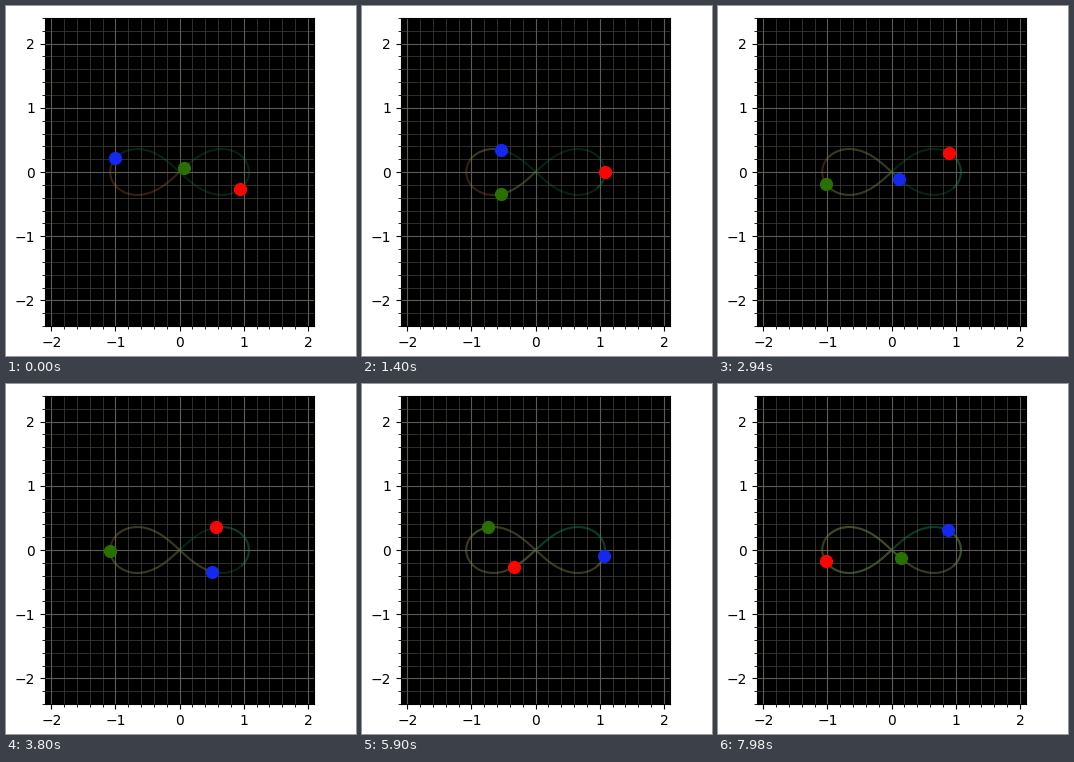
A matplotlib script that plays this animation: 350 by 350 pixels, repeating every 8000 ms.

```python
"""Three equal masses chasing each other along a figure-eight orbit."""
import numpy as np
import matplotlib.pyplot as plt
from matplotlib.animation import FuncAnimation
from matplotlib.collections import LineCollection

SIZE, DPI = 350, 100
TICK_MS, LOOP_MS = 20, 8000
DT = 0.0198
LEAD = 103  # steps already travelled when the loop starts
STEPS = LEAD + 172
XMAX, YMAX = 2.1, 2.4
LEFT, BOTTOM, WIDTH, HEIGHT = 38.83, 30, 269.5, 308  # plot box in pixels

DOTS = ["#fc0500", "#2a7000", "#1428f0"]
TRAILS = [("#148250", 0.27), ("#148250", 0.27), ("#b06e38", 0.30)]


def deriv(state):
    pos, vel = state
    gap = pos[None, :, :] - pos[:, None, :]
    dist = np.sqrt((gap ** 2).sum(axis=2)) + np.eye(3)
    acc = (gap / dist[:, :, None] ** 3).sum(axis=1)
    return np.array([vel, acc])


def orbit():
    """Positions of the three bodies at every step, by Runge-Kutta."""
    p = np.array([0.97000436, -0.24308753])
    v = np.array([-0.93240737, -0.86473146])
    state = np.array([[-p, p, 0 * p], [-v / 2, -v / 2, v]])
    path = [state[0]]
    for _ in range(STEPS - 1):
        k1 = deriv(state)
        k2 = deriv(state + DT / 2 * k1)
        k3 = deriv(state + DT / 2 * k2)
        k4 = deriv(state + DT * k3)
        state = state + DT / 6 * (k1 + 2 * k2 + 2 * k3 + k4)
        path.append(state[0])
    return np.array(path)


def step_at(ms):
    """Three steps per 140 ms, held for 20, 100 and 20 ms."""
    cycle, phase = divmod(ms, 140)
    return LEAD + 3 * cycle + (phase >= 20) + (phase >= 120)


def minor_values(n):
    return [i / 5 for i in range(-n, n + 1) if i % 5]


def add_minor_grid(ax):
    xs, ys = minor_values(10), minor_values(12)
    grid = [[(x, -YMAX), (x, YMAX)] for x in xs]
    grid += [[(-XMAX, y), (XMAX, y)] for y in ys]
    ax.add_collection(LineCollection(grid, colors="#383830", linewidths=0.6,
                                     zorder=0.5), autolim=False)
    tick = 0.043
    marks = [[(x, -YMAX), (x, -YMAX - tick)] for x in xs]
    marks += [[(-XMAX, y), (-XMAX - tick, y)] for y in ys]
    ax.add_collection(LineCollection(marks, colors="black", linewidths=0.6,
                                     clip_on=False), autolim=False)


fig = plt.figure(figsize=(SIZE / DPI, SIZE / DPI), dpi=DPI, facecolor="white")
ax = fig.add_axes([LEFT / SIZE, BOTTOM / SIZE, WIDTH / SIZE, HEIGHT / SIZE],
                  facecolor="black")
ax.set(xlim=(-XMAX, XMAX), ylim=(-YMAX, YMAX),
       xticks=range(-2, 3), yticks=range(-2, 3))
ax.set_axisbelow(True)
ax.grid(color="#5c5c56", linewidth=0.8)
add_minor_grid(ax)

path = orbit()
trails = [ax.plot([], [], color=c, alpha=a, lw=1.5, zorder=2)[0]
          for c, a in TRAILS]
dots = [ax.plot([], [], "o", color=c, ms=8.5, zorder=3)[0] for c in DOTS]


def update(frame):
    now = step_at(frame * TICK_MS)
    for body, (trail, dot) in enumerate(zip(trails, dots)):
        trail.set_data(*path[:now + 1, body].T)
        dot.set_data(*path[now:now + 1, body].T)
    return trails + dots


anim = FuncAnimation(fig, update, frames=LOOP_MS // TICK_MS,
                     interval=TICK_MS, repeat=True, repeat_delay=0)
plt.show()
```
